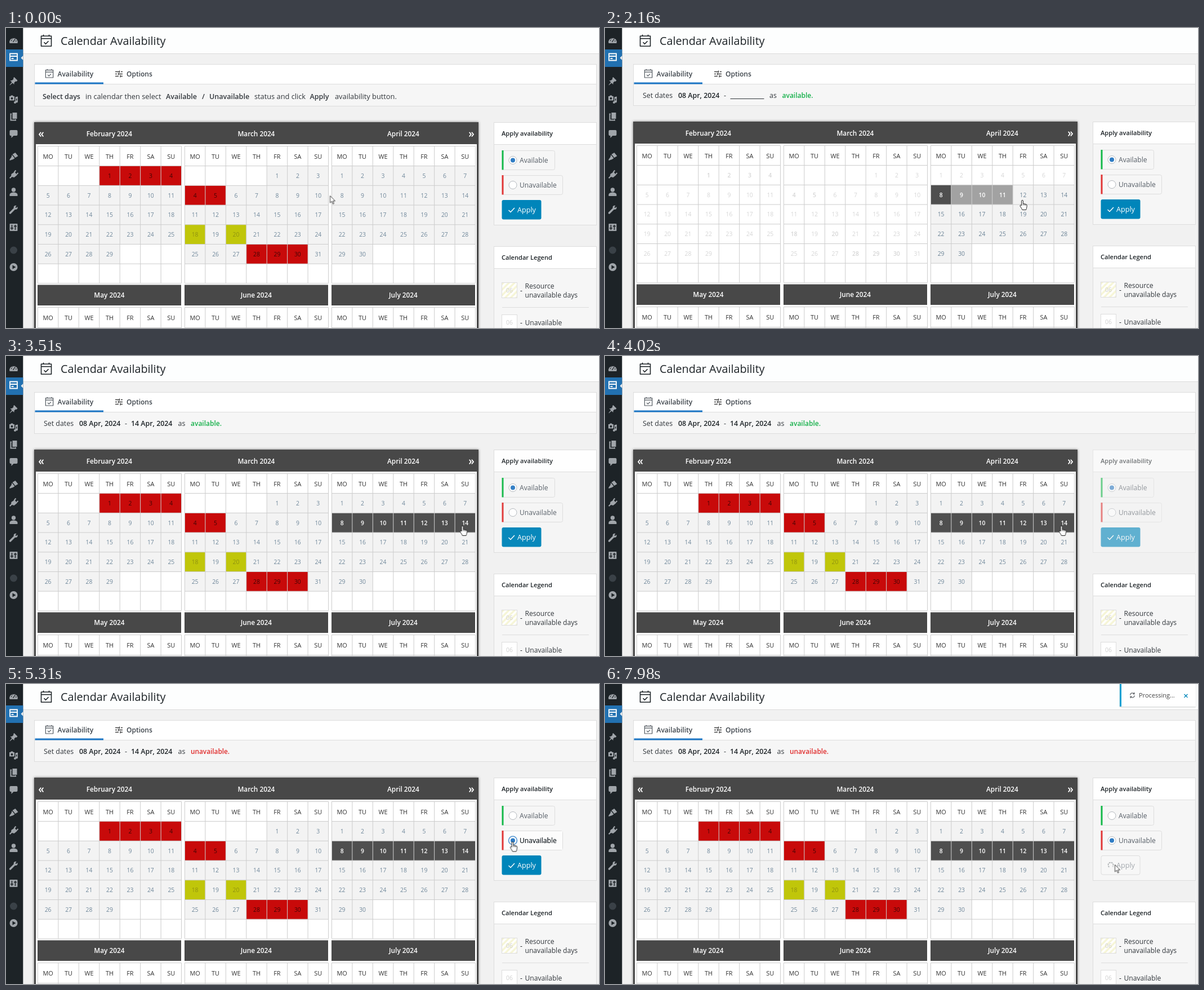
Animation, 1053 px wide and 532 px high, one loop 8000 ms. Source, as an HTML page:

```html
<!DOCTYPE html>
<html lang="en">
<head>
<meta charset="utf-8">
<title>Calendar Availability</title>
<style>
html, body { margin: 0; width: 100%; height: 100%; overflow: hidden; background: #f1f1f1; }
svg { display: block; width: 1053px; height: 532px; font-family: "Open Sans", sans-serif; }
text { white-space: pre; }
.step { animation: 8s step-end infinite; }

/* calendar states: idle, picking a range, range picked */
#page { animation-name: lift; }
.start { animation-name: start; }
.chosen { animation-name: chosen; }
.idle { animation-name: idle; }
.pick { animation-name: pick; }
.picked { animation-name: picked; }
.free { animation-name: free; }
.freeSet { animation-name: freeSet; }
.busy { animation-name: busy; }
.first { animation-name: first; }
.range { animation-name: range; }
@keyframes lift { 0% { transform: translateY(1px); } 17.5%, 100% { transform: none; } }
@keyframes start { 0% { visibility: visible; } 17.5%, 100% { visibility: hidden; } }
@keyframes chosen { 0% { visibility: hidden; } 17.5%, 100% { visibility: visible; } }
@keyframes idle { 0% { visibility: visible; } 17.5% { visibility: hidden; } 38.06%, 100% { visibility: visible; } }
@keyframes pick { 0% { visibility: hidden; } 17.5% { visibility: visible; } 38.06%, 100% { visibility: hidden; } }
@keyframes picked { 0% { visibility: hidden; } 38.06%, 100% { visibility: visible; } }
@keyframes free { 0% { visibility: visible; } 66.2%, 100% { visibility: hidden; } }
@keyframes freeSet { 0% { visibility: hidden; } 38.06% { visibility: visible; } 66.2%, 100% { visibility: hidden; } }
@keyframes busy { 0% { visibility: hidden; } 66.2%, 100% { visibility: visible; } }
@keyframes first { 0% { visibility: hidden; } 4.4% { visibility: visible; } 17.5%, 100% { visibility: hidden; } }
@keyframes range {
  0% { width: 0; } 25.6% { width: 36.45px; } 26.1% { width: 72.9px; } 26.6% { width: 109.35px; }
  27.5% { width: 145.8px; } 28.2% { width: 182.25px; } 29.6%, 100% { width: 219px; }
}

/* side panel */
#apply { animation: blink 8s cubic-bezier(.37, 0, .63, 1) infinite; }
.focus { animation-name: focus; }
.over { animation-name: over; }
.btnOver { animation-name: btnOver; }
.ready { animation-name: ready; }
.wait { animation-name: wait; }
@keyframes blink {
  0%, 38.06%, 43.56%, 49.06%, 54.56%, 100% { opacity: 1; }
  40.81%, 46.31%, 51.81% { opacity: 0; }
}
@keyframes focus { 0% { visibility: hidden; } 66.2% { visibility: visible; } 88%, 100% { visibility: hidden; } }
@keyframes over { 0% { visibility: hidden; } 57.8% { visibility: visible; } 80.8%, 100% { visibility: hidden; } }
@keyframes btnOver { 0% { visibility: hidden; } 81.8% { visibility: visible; } 88%, 100% { visibility: hidden; } }
@keyframes ready { 0% { visibility: visible; } 88%, 100% { visibility: hidden; } }
@keyframes wait { 0% { visibility: hidden; } 88%, 100% { visibility: visible; } }
#toast { animation: toast 8s linear infinite; }
.spin { animation: spin 1s linear infinite; }
@keyframes toast { 0%, 88% { opacity: 0; } 91%, 100% { opacity: 1; } }
@keyframes spin { to { transform: rotate(360deg); } }

/* pointer */
#pointer { animation: travel 8s linear infinite; }
#arrow { animation-name: arrow; }
#hand { animation-name: hand; }
#press { animation: press 8s linear infinite; }
@keyframes travel {
  0%, 3.2% { transform: translate(575.5px, 297.5px); animation-timing-function: ease-in-out; }
  6.25%, 23.8% { transform: translate(591.5px, 297.5px); animation-timing-function: cubic-bezier(.45, 0, .75, .75); }
  27% { transform: translate(740.5px, 306px); animation-timing-function: cubic-bezier(.15, .6, .4, 1); }
  33.9%, 52.8% { transform: translate(810.5px, 302px); animation-timing-function: cubic-bezier(.5, 0, .8, .8); }
  57.5% { transform: translate(879px, 284px); animation-timing-function: cubic-bezier(.2, .6, .5, 1); }
  62%, 77.8% { transform: translate(899.5px, 280.5px); animation-timing-function: ease-in-out; }
  84.6%, 100% { transform: translate(905.5px, 320.5px); }
}
@keyframes arrow {
  0% { visibility: visible; } 4.4% { visibility: hidden; } 55% { visibility: visible; }
  57.8% { visibility: hidden; } 80.8% { visibility: visible; } 81.8% { visibility: hidden; } 88%, 100% { visibility: visible; }
}
@keyframes hand {
  0% { visibility: hidden; } 4.4% { visibility: visible; } 55% { visibility: hidden; }
  57.8% { visibility: visible; } 80.8% { visibility: hidden; } 81.8% { visibility: visible; } 88%, 100% { visibility: hidden; }
}
@keyframes press {
  0%, 14.7% { opacity: 0; } 14.75%, 17.4% { opacity: .9; } 17.5%, 36.9% { opacity: 0; }
  37%, 38% { opacity: .9; } 39%, 64.4% { opacity: 0; }
  64.5%, 65.2% { opacity: .9; } 66.3%, 85.5% { opacity: 0; }
  85.6%, 86.6% { opacity: .9; } 87.8%, 100% { opacity: 0; }
}
</style>
</head>
<body>
<script>
const COL = 36.45, ROW = 34.72, TOP = 243.6;
const INK = '#1d2327', DARK = '#484848', LINE = '#ccc', BLUE = '#1b76c5';

// y is the middle of the capitals
const text = (x, y, s, size, fill = INK, weight = 400, anchor = 'start') =>
  `<text x="${x}" y="${y + size * .36}" font-size="${size}" fill="${fill}" font-weight="${weight}" text-anchor="${anchor}">${s}</text>`;
const mid = (x, y, s, size, fill, weight) => text(x, y, s, size, fill, weight, 'middle');
const rect = (x, y, w, h, fill, more = '') =>
  `<rect x="${x}" y="${y}" width="${w}" height="${h}" fill="${fill}" ${more}/>`;
const path = (d, stroke, width = 1, fill = 'none', more = '') =>
  `<path d="${d}" stroke="${stroke}" stroke-width="${width}" fill="${fill}" ${more}/>`;
const when = (cls, body) => `<g class="step ${cls}">${body}</g>`;
const at = (x, y, body, scale = 1) => `<g transform="translate(${x} ${y}) scale(${scale})">${body}</g>`;

function cell(x, slot, day, bg, fill, weight) {
  const cx = x + slot % 7 * COL, cy = TOP + Math.floor(slot / 7) * ROW;
  return rect(cx, cy, COL, ROW, bg) + mid(cx + COL / 2, cy + 17.6, day, 10.4, fill, weight);
}

const months = [
  { name: 'February 2024', next: 'May 2024', x: 56.4, skip: 3, days: 29, red: [1, 2, 3, 4], gold: [] },
  { name: 'March 2024', next: 'June 2024', x: 317.4, skip: 4, days: 31, red: [4, 5, 28, 29, 30], gold: [18, 20] },
  { name: 'April 2024', next: 'July 2024', x: 578.4, skip: 0, days: 30, red: [], gold: [] }
];
const april = months[2].x;

const days = paint => months.map(m =>
  Array.from({ length: m.days }, (_, i) => cell(m.x, m.skip + i, i + 1, ...paint(m, i + 1))).join('')).join('');

const idleDay = (m, d) =>
  m.red.includes(d) ? ['#c80a0a', '#420404', 500] :
  m.gold.includes(d) ? ['#c0c60a', '#8f9310', 500] : ['#f3f3f3', '#70889b', 400];
const pickDay = (m, d) =>
  m.x === april && d > 8 ? ['#f3f3f3', '#6b8396', 500] :
  ['#fff', '#d6d6d6', m.red.includes(d) || m.gold.includes(d) ? 600 : 400];
const week = (from, bg) =>
  Array.from({ length: 15 - from }, (_, i) => cell(april, from - 1 + i, from + i, bg, '#fff', 600)).join('');

function grid(m) {
  let d = '';
  for (let i = 0; i < 8; i++) {
    const x = m.x + i * COL;
    d += `M${x} 208.5V451.5M${x} 494.5V532`;
  }
  for (const y of [208.5, 494.5, 530.5, ...Array.from({ length: 7 }, (_, i) => TOP + i * ROW)])
    d += `M${m.x} ${y}h255`;
  return path(d, LINE);
}

const weekdays = m => ['MO', 'TU', 'WE', 'TH', 'FR', 'SA', 'SU'].map((s, i) =>
  [226.7, 512.7].map(y => mid(m.x + (i + .5) * COL, y, s, 10.9, '#333', 500)).join('')).join('');

const calendar =
  rect(50, 166, 789, 380, DARK, 'style="filter:drop-shadow(0 0 2px #0008)"') +
  rect(53, 205, 783, 340, '#fff') +
  months.map(m => mid(m.x + 127, 186.9, m.name, 11.8, '#fff', 600)).join('') +
  when('idle', mid(62.5, 185.7, '«', 19, '#fff', 600) + days(idleDay)) +
  mid(826.5, 185.7, '»', 19, '#fff', 600) +
  when('first', cell(april, 7, 8, '#a2a2a2', '#fff', 600)) +
  when('pick', days(pickDay) + cell(april, 7, 8, '#4f4f4f', '#fff', 600) +
    `<g clip-path="url(#reach)">${week(9, '#a2a2a2')}</g>`) +
  when('picked', week(8, '#4f4f4f')) +
  months.map(m => grid(m) + weekdays(m) + rect(m.x - .4, 454.5, 255, 36.5, DARK) +
    mid(m.x + 127, 473, m.next, 11.8, '#fff', 600)).join('');

const panel = (y, h, title) =>
  rect(866.5, y + .5, 182, h, '#f6f6f6', 'stroke="#ddd"') + rect(867, y + 1, 181, 38, '#fff') +
  path(`M867 ${y + 39.5}h181`, '#ddd') + text(880, y + 20.5, title, 11.1, INK, 600);

const dot = y => `<circle cx="900" cy="${y}" r="4" fill="#2f7cc4"/>`;
function choice(y, w, name, color) {
  return rect(881.5, y + .5, w, 34, '#f6f6f6', 'rx="3" stroke="#ddd"') +
    (name === 'Unavailable' ? when('over', rect(883, y + 1, w - 2, 33, '#fcfcfc')) : '') +
    rect(880.5, y, 3, 34.5, color) +
    `<circle cx="900" cy="${y + 17.5}" r="7" fill="#fff" stroke="#b4b9be"/>` +
    text(912, y + 17.5, name, 12.1, '#555d66');
}

const gap = 'stroke-dasharray="2.4 1.5"';
const applyPanel = `<g id="apply">` + panel(166, 182, 'Apply availability') +
  choice(216, 93, 'Available', '#14b849') + choice(260, 107, 'Unavailable', '#e03636') +
  when('over', text(912, 277.5, 'Unavailable', 12.1, INK)) +
  when('free', dot(233.5)) +
  when('busy', dot(277.5)) +
  when('focus', '<circle cx="900" cy="277.5" r="7.5" fill="none" stroke="#5b9dd9" stroke-width="1.6"/>') +
  when('ready', rect(880.5, 304, 70, 34.5, '#0085ba', 'rx="3"') +
    when('btnOver', rect(880.5, 304, 70, 34.5, '#008ec2', 'rx="3"')) +
    path('M892.5 322l3.5 3.5l7-7.5', '#fff', 1.4) + text(908, 321.5, 'Apply', 12.6, '#fff')) +
  when('wait', rect(881, 304.5, 69, 33.5, '#f7f7f7', 'rx="3" stroke="#ddd"') +
    text(908, 321.5, 'Apply', 12.6, '#a4a9ae') +
    at(898, 321, `<g class="spin">${path('M-3.2 3.2A4.5 4.5 0 1 1 3.2 3.2', '#8c9196', 1.4, 'none', gap)}</g>`)) +
  `</g>`;

const sample = (y, fill) => rect(880.5, y + .5, 27, 27, fill, 'stroke="#ddd"') +
  mid(894, y + 14, '06', 10.4, '#cfcfcf') + text(913, y + 15, '-', 12.1);
const legend = panel(386, 160, 'Calendar Legend') +
  sample(450, 'url(#stripe)') + text(921.5, 456.5, 'Resource', 12.1, '#32373c') +
  text(921.5, 473, 'unavailable days', 12.1, '#32373c') +
  path('M881 494.5h154', '#ddd') +
  sample(507, '#fff') + text(921.5, 521.5, 'Unavailable', 12.1, '#32373c');

const calIcon = color =>
  path('M-9-8.5H9V9.5H-9ZM-9-4H9M-5-11v3M5-11v3', color, 1.6, 'none', 'stroke-linejoin="round"') +
  path('M-4 2.5l3 3l5-5', color, 1.6);
const header = rect(30, 0, 1023, 45, '#fdfefe') + path('M30 45.5h1023', '#dcdcdc') +
  at(71.5, 22.8, calIcon(INK)) + text(97, 22.5, 'Calendar Availability', 19.8);

const strip = (h, body) => rect(50.5, 99.5, 998, h, '#f6f6f6', 'stroke="#ddd"') + body;
const said = (x, s, fill = '#32373c', weight = 400, size = 12.4) => text(x, 119.5, s, size, fill, weight);
const hint = [[65, 'Select days', 600], [141, 'in calendar then select', 400], [284, 'Available', 600], [348, '/', 600],
  [361, 'Unavailable', 600], [441, 'status and click', 400], [539.5, 'Apply', 600], [584, 'availability button.', 400]]
  .map(([x, s, w]) => text(x, 121, s, w === 600 ? 12.5 : 12.8, '#32373c', w)).join('');
const GREEN = '#14b049', RED = '#e02b2b';

const toolbar = rect(50.5, 64.5, 998, 35, '#fff', 'stroke="#ddd"') +
  at(77, 81, calIcon('#50575e'), .74) + text(91.5, 81.5, 'Availability', 12, '#3c434a', 600) +
  path('M194 77.5h7m3 0h3M194 81.5h3m3 0h7M194 85.5h6m3 0h4M201.5 75.5v4M199.5 79.5v4M203 83.5v4', '#444', 1.3) +
  text(214, 81.5, 'Options', 12, '#3c434a', 600) +
  when('start', strip(39, hint)) +
  when('chosen', strip(38, said(67, 'Set dates') + said(130, '08 Apr, 2024', INK, 600) + said(211, '-'))) +
  when('pick', path('M222.5 125.5h60', '#32373c') + said(292, 'as') + said(314.5, 'available.', GREEN, 600, 12)) +
  when('picked', said(222, '14 Apr, 2024', INK, 600) + said(305.5, 'as')) +
  when('freeSet', said(328, 'available.', GREEN, 600, 12)) +
  when('busy', said(328, 'unavailable.', RED, 600, 11.8)) +
  rect(51.5, 96.5, 121.5, 3, BLUE);

const GREY = '#a0a5aa', BAR = '#1d2327';
const fill = (d, more = '') => path(d, 'none', 0, GREY, more);
const icons = [
  [22, fill('M-7 5A7.3 7.3 0 1 1 7 5Z') + path('M-1 3L3-3M-4.5 0h1.5M-3-3.5l1 1M0-5v1.5M5 1h-1.5', BAR, 1.3)],
  [52, path('M-6.5-6.5H6.5V5.5H-6.5ZM-6.5-2H6.5M-4 2h4', '#fff', 1.8)],
  [94, fill('M1-7L7-1L5 1L3.5.5L1 3L1 6L-2 3.5L-6.5 7.5L-7 7L-3 2L-6-1L-3-1L0-3.5L-.5-5Z')],
  [126, fill('M-7.5-5h2l1-1.5h3l1 1.5h2V2.5h-9Z') +
    fill('M3-3.5L7.5-4.5V4.5a2 2 0 1 1-1.5-2V-1L4.5-.5V6a2 2 0 1 1-1.5-2Z') +
    `<circle cx="-3" cy="-1.2" r="1.9" fill="${BAR}"/>`],
  [157, fill('M-2-7H6V4H-2Z') + path('M-3.5-4.5H-5V6.5H3.5V5', GREY, 2)],
  [187, fill('M-5-6H5Q7-6 7-4V2Q7 4 5 4H0L-4 8V4H-5Q-7 4-7 2V-4Q-7-6-5-6Z')],
  [228, fill('M-2-4L3-7L8-1L3 2ZM-3-3L2 3L-1 5L-7 7L-7 5L-4 1Z')],
  [260, fill('M-4-1L2-5L6 1L1 5L-3 4L-6 7L-7.5 5.5L-4.5 2.5Z') + path('M1-4L4-7.5M5 0L8-3', GREY, 2)],
  [291, `<circle cy="-4" r="3.7" fill="${GREY}"/>` + fill('M-7 7V4Q-6 .5 0 .5T7 4V7Z')],
  [322, path('M-6 6L2-2', GREY, 3.4, 'none', 'stroke-linecap="round"') +
    fill('M0-4Q1-8 5-7L3-4L4.5-3L7-5Q8-.5 4 0Q1 0 0-4Z')],
  [353, rect(-7, -6, 14, 13, GREY, 'rx="1"') + path('M-3-4V5M3-4V5M-5.5 2h5M.5-1.5h5', BAR, 1.5)],
  [394, '<circle r="6.5" fill="#3a4147"/>'],
  [424, `<circle r="7" fill="${GREY}"/>` + path('M-2-3.5L4 0L-2 3.5Z', 'none', 0, BAR)]
];
const sidebar = rect(0, 0, 30.3, 532, BAR) + rect(0, 38, 30.3, 31, '#2271b1') +
  path('M30.3 49L26.5 53L30.3 57Z', 'none', 0, '#f1f1f1') +
  icons.map(([y, body]) => at(13.5, y, body)).join('');

const toast = `<g id="toast">` + rect(914, -2, 135, 42, '#fff', 'style="filter:drop-shadow(0 1px 1px #0003)"') +
  rect(914, 0, 3, 40, '#00a0d2') +
  at(936.5, 20, `<g class="spin">${path('M-3.8-1A4 4 0 0 1 3.2-2.5M3.8 1A4 4 0 0 1-3.2 2.5M3.8-4.5V-2H1.3M-3.8 4.5V2H-1.3', '#32373c', 1.1)}</g>`) +
  text(948, 20.5, 'Processing...', 11, '#444') + path('M1028.5 18l6 6m0-6l-6 6', '#0085ba', 1.3) + `</g>`;

const pointer = `<g id="pointer"><circle id="press" r="11" fill="#9ccb2c"/>` +
  `<g id="arrow" class="step">${path('M0 0V12.5L3 9.8L5 14.5L7 13.6L5 9.2H9Z', '#222', .9, '#fff')}</g>` +
  `<g id="hand" class="step">${path('M-1.4 9V.8a1.4 1.4 0 0 1 2.8 0V5.5L6.5 6.5Q8.5 7 8.3 9.5L7.5 13.5L6.5 16.5H0L-1.5 13.5L-4 9.8Q-4 7.5-2.3 8Z', '#222', 1, '#fff', 'stroke-linejoin="round"') +
  path('M1.4 5.5V8.5M3.8 6V8.7M6 6.5V9', '#222', .8)}</g></g>`;

document.body.innerHTML = `<svg viewBox="0 0 1053 532">
<defs>
<clipPath id="reach"><rect class="step range" x="${april + COL}" y="270" width="0" height="50"/></clipPath>
<pattern id="stripe" width="7" height="7" patternUnits="userSpaceOnUse" patternTransform="rotate(45)">
${rect(0, 0, 7, 7, '#fff')}${rect(3.5, 0, 3.5, 7, '#f6f5d6')}</pattern>
</defs>
${rect(0, 0, 1053, 532, '#f1f1f1')}${header}${toolbar}
<g id="page" class="step">${calendar}${applyPanel}${legend}</g>
${sidebar}${toast}${pointer}</svg>`;
</script>
</body>
</html>
```
